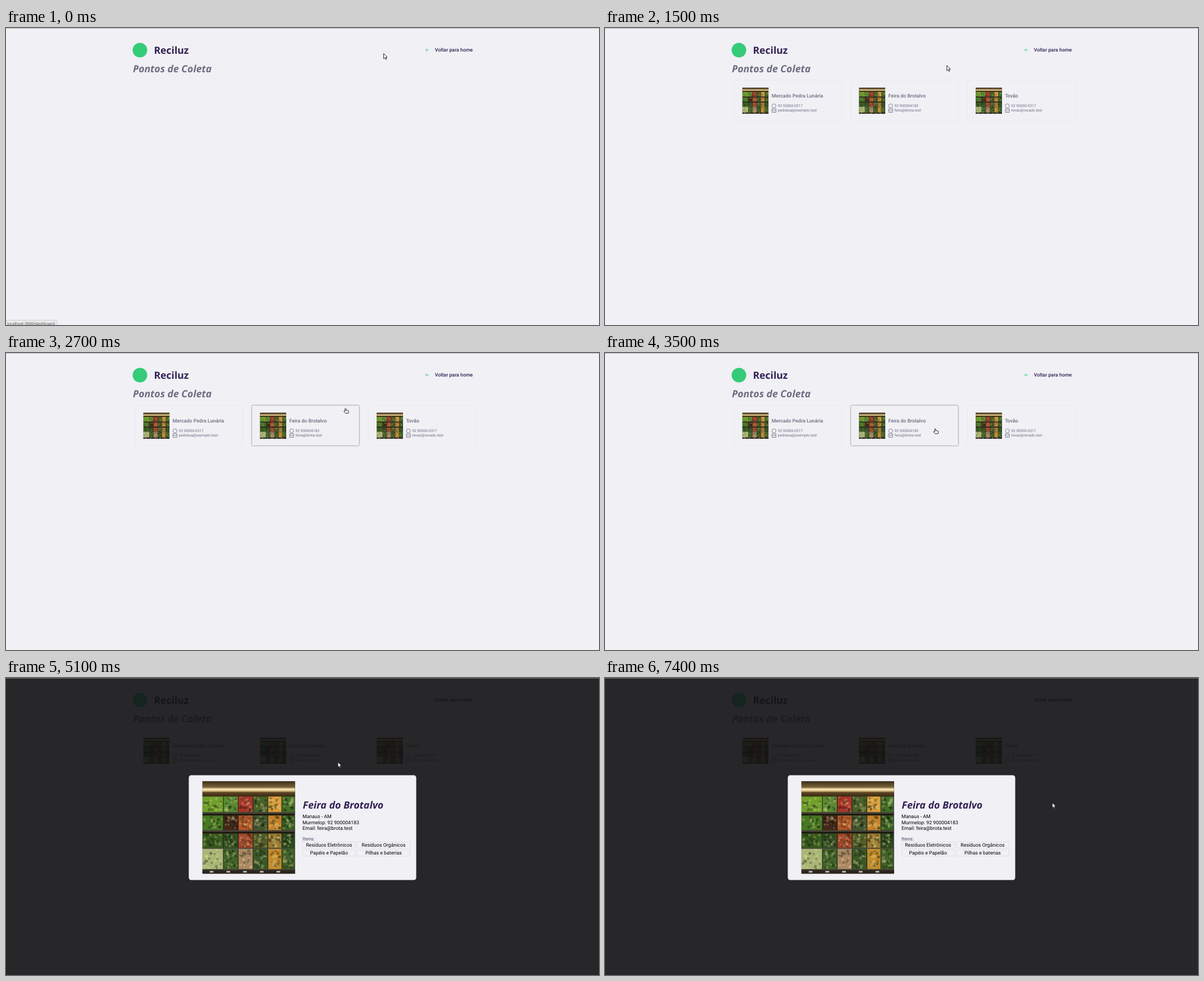
Write an HTML page that moves like this. It is 1056 px wide and 530 px high and loops after 8000 ms.

```html
<!DOCTYPE html>
<html lang="pt-BR">
<head>
<meta charset="utf-8">
<title>Pontos de Coleta</title>
<style>
html, body { margin: 0; width: 100%; height: 100%; overflow: hidden; background: #f0f0f5; }
svg { display: block; width: 1056px; height: 530px; }
text { font: 8.8px Roboto, sans-serif; text-rendering: geometricPrecision; white-space: pre; }
.brand { font: 700 17.6px "Open Sans", sans-serif; fill: #322153; }
.heading { font: italic 700 17.6px "Open Sans", sans-serif; fill: #6c6c80; }
.title { font: italic 700 17.8px "Open Sans", sans-serif; fill: #322153; }
.link { font-weight: 500; fill: #322153; }
.name { font-weight: 500; fill: #6c6c80; }
.small { font-size: 6.6px; fill: #6c6c80; }
.url { font: 7px "Open Sans", sans-serif; fill: #444; }
.mid { text-anchor: middle; }
.card { fill: #f0f0f5; filter: drop-shadow(0 .4px .8px rgba(0, 0, 0, .07)); }
.hover { fill: #f0f0f5; filter: drop-shadow(0 .6px 1px rgba(0, 0, 0, .62)); }
.icon { fill: none; stroke: #55556a; stroke-width: .7; }
.cursor { fill: #fff; stroke: #111; stroke-width: .9; stroke-linejoin: round; }
</style>
</head>
<body>
<svg viewBox="0 0 1056 530">
  <defs>
    <linearGradient id="lamp" x2="0" y2="1">
      <stop stop-color="#3b2d1a"/>
      <stop offset=".38" stop-color="#7a6238"/>
      <stop offset=".5" stop-color="#f8e8b8"/>
      <stop offset=".6" stop-color="#e8cf92"/>
      <stop offset=".72" stop-color="#5e4524"/>
      <stop offset="1" stop-color="#33240f"/>
    </linearGradient>
    <symbol id="photo" viewBox="0 0 100 100"></symbol>
  </defs>
  <rect width="1056" height="530" fill="#f0f0f5"/>
  <rect width="1056" height="1" fill="#b6b6ba"/>
  <circle cx="238.5" cy="39.5" r="13" fill="#34cb79"/>
  <text class="brand" x="263.5" y="46">Reciluz</text>
  <text class="heading" x="226" y="78.7">Pontos de Coleta</text>
  <path d="M753 39.2H747.6M750 36.6L747.4 39.2 750 41.8" fill="none" stroke="#34cb79" stroke-width=".9"/>
  <text class="link" x="763.7" y="42.2">Voltar para home</text>
  <g id="cards"></g>
  <g id="status">
    <path d="M-1 521.5H89Q91 521.5 91 523.5V531H-1z" fill="#ececee" stroke="#cfcfd2"/>
    <text class="url" x="2" y="529.6">localhost:3000/dashboard</text>
  </g>
  <g id="modal">
    <rect y=".5" width="1056" height="530" fill="#121214" opacity=".9"/>
    <rect x="325.5" y="173.5" width="405" height="187" rx="4.4" fill="#f0f0f5"/>
    <use href="#photo" x="349.6" y="184.2" width="165.2" height="165.2"/>
    <text class="title" x="528.5" y="232.5">Feira do Brotalvo</text>
    <text x="528" y="250.4">Manaus - AM</text>
    <text x="528" y="260.9">Murmelop: 92 900004183</text>
    <text x="528" y="271.4">Email: feira@brota.test</text>
    <text class="name" x="528" y="290">Itens:</text>
    <g id="items"></g>
  </g>
  <path id="arrow" class="cursor" d="M.5 .5V9.8L2.6 7.9 4.1 11.2 5.6 10.5 4.2 7.3H7z"/>
  <path id="hand" class="cursor" d="M2.6 1.4Q3.5 -.2 4.5 1.4V4L8 4.6Q9.5 5 9.2 6.5L8.6 9.5H3.6L.8 6.6Q.5 5 2 5.4L2.9 6z"/>
</svg>
<script>
const $ = id => document.getElementById(id);
const text = (x, y, cls, s) => `<text x="${x}" y="${y}" class="${cls}">${s}</text>`;
const rect = (x, y, w, h, fill) => `<rect x="${x}" y="${y}" width="${w}" height="${h}" fill="${fill}"/>`;

let seed = 7;
const random = () => (seed = seed * 16807 % 2147483647) / 2147483647;

// Market shelves: four rows of produce, six crates each
function shelves() {
  const edges = [0, 23, 39, 55, 71, 86, 100];
  const rows = [
    [16.5, 17, "#6f9f2c #5b8a34 #a8352a #47602a #d59d3c #44702a"],
    [37, 16, "#467723 #43281a #b0562a #435730 #c2802a #375f24"],
    [56.5, 15.5, "#375a1f #324f23 #a0452a #525e2a #9a7b34 #2b4a20"],
    [73, 22, "#a9b676 #40632a #ab8864 #395727 #c08b2c #41632a"]
  ];
  let out = rect(0, 0, 100, 100, "#1d180f") + rect(0, 0, 100, 17, "url(#lamp)");
  for (const [y, h, colors] of rows) {
    colors.split(" ").forEach((color, i) => {
      const x = edges[i], w = edges[i + 1] - x - .6;
      out += rect(x, y, w, h, color);
      for (let n = 0; n < 24; n++) {
        const r = 1 + random() * .7;
        const cx = x + r + random() * (w - 2 * r), cy = y + r + random() * (h - 2 * r);
        out += `<circle cx="${cx}" cy="${cy}" r="${r}" fill="${n % 2 ? "#fff0a8" : "#0c1205"}" opacity="${n % 2 ? .22 : .3}"/>`;
      }
    });
    out += rect(0, y + h, 100, 1.6, "#4a463c");
  }
  out += rect(0, 96, 100, 4, "#2b251d");
  for (let x = 8; x < 98; x += 18) out += rect(x, 97, 4, 1.6, "#c9c5b8");
  return out;
}

function card([name, phone, mail], i) {
  const x = 230.3 + i * 207.8;
  const box = cls => `<rect x="${x}" y="93.7" width="190.6" height="71.4" rx="1.6" class="${cls}"/>`;
  return box("card") + (i === 1 ? `<g id="glow">${box("hover")}</g>` : "")
    + `<use href="#photo" x="${x + 14.2}" y="106.4" width="46.8" height="46.8"/>`
    + text(x + 66.5, 124.3, "name", name)
    + text(x + 77.4, 141.1, "small", phone) + text(x + 77.4, 149.3, "small", mail)
    + `<g class="icon" transform="translate(${x + 66.6} 135)"><circle cx="4" cy="4" r="3.6"/>`
    + `<path d="M.5 9.2H7.5V15.5H.5zM.5 11L4 13.2 7.5 11"/></g>`;
}

$("photo").innerHTML = shelves();
$("cards").innerHTML = [
  ["Mercado Pedra Lunária", "92 90000-0317", "pedralua@exemplo.test"],
  ["Feira do Brotalvo", "92 900004183", "feira@brota.test"],
  ["Tovão", "92 90000-0317", "tovao@recado.test"]
].map(card).join("");
$("items").innerHTML = ["Resíduos Eletrônicos", "Resíduos Orgânicos", "Papéis e Papelão", "Pilhas e baterias"]
  .map((label, i) => {
    const x = 528.3 + i % 2 * 97.2, y = 292.6 + (i >> 1) * 14.2;
    return `<rect x="${x}" y="${y}" width="94" height="11" fill="none" stroke="#dcdce3" stroke-width=".8"/>`
      + text(x + 46.9, y + 8.6, "mid", label);
  }).join("");

// Pointer rests: start time, x, y
const stops = [
  [2700, 601, 98], [3100, 600, 114], [3500, 584.5, 134.5], [4100, 586.5, 135],
  [4800, 586.5, 137], [5100, 590.5, 149.5], [5400, 620, 184.5], [5800, 656.5, 209.5],
  [6100, 709, 220.5], [6400, 728, 222], [6700, 747, 222], [7100, 784, 222], [7400, 796, 222]
];
const easeOut = (u, power) => 1 - (1 - u) ** power;

function pointer(t) {
  if (t < 1000) return [672, 45];
  if (t < 1900) {
    const u = (t - 900) / 900;
    return [672 - 77 * easeOut(u, 1.6), 45 + 32 * u];
  }
  if (t < 2700) {
    const u = easeOut((t - 1800) / 900, 1.6);
    return [595 + 6 * u, 77 + 21 * u];
  }
  return stops.findLast(stop => t >= stop[0]).slice(1);
}

function draw() {
  const t = Math.floor(performance.now() % 8000 / 100) * 100;
  const modal = t >= 4100, hand = t >= 2400 && !modal;
  $("cards").style.opacity = t >= 400 ? 1 : 0;
  $("status").style.opacity = t < 400 ? 1 : t < 600 ? .3 : 0;
  $("glow").style.opacity = modal ? 0 : Math.min(1, Math.max(0, (t - 2300) / 400));
  $("modal").style.display = modal ? "" : "none";
  $("hand").style.display = hand ? "" : "none";
  $("arrow").style.display = hand ? "none" : "";
  $(hand ? "hand" : "arrow").setAttribute("transform", `translate(${pointer(t)})`);
  requestAnimationFrame(draw);
}
draw();
</script>
</body>
</html>
```
